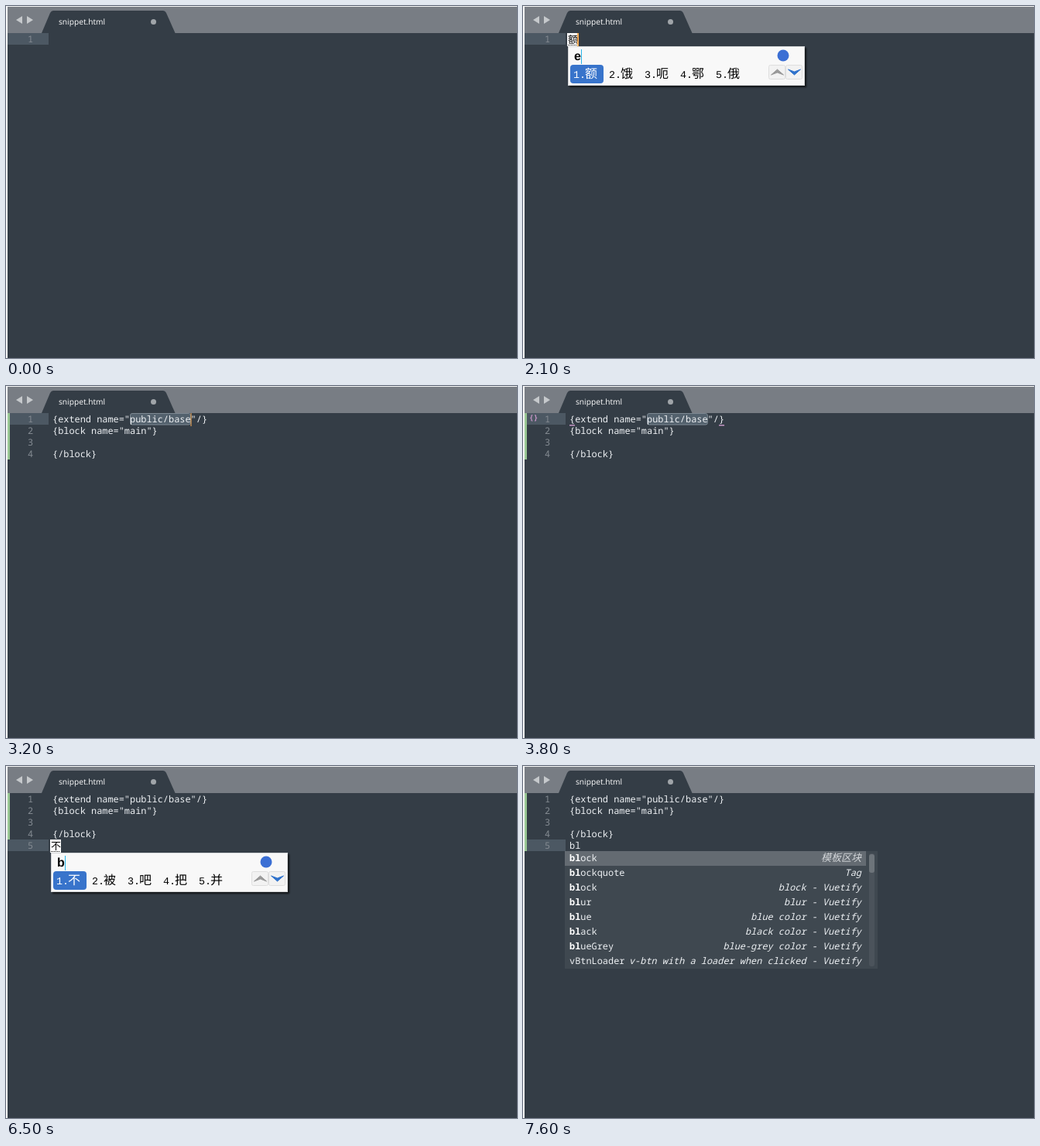
An HTML page for the animation above (8 s loop, 660x455 px).

```html
<!DOCTYPE html>
<html lang="en">
<head>
<meta charset="utf-8">
<title>Snippet typing</title>
<style>
  html, body { margin: 0; width: 100%; height: 100%; overflow: hidden; background: #343d46; }
  svg { display: block; width: 660px; height: 455px; }
  text { white-space: pre; text-rendering: geometricPrecision; }
  .code { font: 11.917px "Noto Sans Mono", "Noto Sans CJK SC", monospace; fill: #eef1f4; }
  .num { fill: #848b92; }
  .hint { font-style: italic; text-anchor: end; }
  .cjk { font: 300 16px "Noto Sans CJK SC", "Noto Sans CJK", sans-serif; }
  .digit { font: 13.33px "Liberation Mono", monospace; }
  .comp { font: 13px "Noto Sans CJK SC", "Noto Sans CJK", sans-serif; }
  .typed { font: bold 16px "Liberation Sans", sans-serif; }
  .tab { font: 10.2px "Open Sans", sans-serif; fill: #fff; }
</style>
</head>
<body>
<svg viewBox="0 0 660 455" xmlns="http://www.w3.org/2000/svg">
  <defs>
    <filter id="shade" x="-5%" y="-10%" width="110%" height="130%">
      <feDropShadow dx="2" dy="2" stdDeviation="1" flood-opacity=".7"/>
    </filter>
    <clipPath id="page"><path d="M2 35H660V455H2z"/></clipPath>
  </defs>
  <path d="M0 0H660V455H0z" fill="#f4f5f5"/>
  <path d="M2 1H660V35H2z" fill="#787d84"/>
  <path d="M2 35H660V455H2z" fill="#343d46"/>
  <path d="M46 35L57 9Q58.500 6 61 6H203Q205.500 6 207 9L218.500 35z" fill="#343d46"/>
  <path d="M21 13V23L13 18zM27 13V23L35 18z" fill="#c6c9cc"/>
  <text class="tab" x="68" y="24">snippet.html</text>
  <circle cx="190.500" cy="20.500" r="3.500" fill="#a0a5a9"/>
  <g id="view" clip-path="url(#page)"></g>
</svg>
<script>
const LOOP = 8000, CH = 7.15, ROW = 15, TOP = 35;
const page = document.getElementById('view');

const snippet = ['{extend name="public/base"/}', '{block name="main"}', '    ', '{/block}'];
const withLast = s => [...snippet, s];

const panels = {
  t: { w: 5.3, words: ['他', '她', '它', '天', '太'] },
  e: { w: 8.9, words: ['额', '饿', '呃', '鄂', '俄'] },
  ex: { w: 17.8, words: ['恶心', '恶性', '二线', '恶行', '饿'] },
  b: { w: 9.8, words: ['不', '被', '吧', '把', '并'] },
  bl: { w: 14.2, words: ['比例', '玻璃', '办理', '暴力', '部落'] }
};

const lists = {
  ex: { right: 401, items: [
    ['extend', '模板继承'], ['exit', 'exit icon - Vuetify'], ['expand', 'expand - Vuetify'],
    ['explore', 'explore icon - Vuetify'], ['export', 'export default'],
    ['extension', 'extension icon - Vuetify'], ['exposure', 'exposure icon - Vuetify'],
    ['vExpansionPanels', 'v-expansion-panels - Vuetify']] },
  bl: { right: 458, items: [
    ['block', '模板区块'], ['blockquote', 'Tag'], ['block', 'block - Vuetify'],
    ['blur', 'blur - Vuetify'], ['blue', 'blue color - Vuetify'],
    ['black', 'black color - Vuetify'], ['blueGrey', 'blue-grey color - Vuetify'],
    ['vBtnLoader', 'v-btn with a loader when clicked - Vuetify']] }
};

// Each step changes only the listed parts of the editor state.
const steps = [
  [0, { lines: [''], row: 0, col: 0, caret: 0, bar: 0, comp: '', panel: '', list: '', pair: null, sel: null, block: false }],
  [900, { caret: 1 }],
  [1200, { comp: '他', panel: 't' }],
  [1300, { caret: 0 }],
  [1700, { caret: 1 }],
  [1900, { comp: '', panel: '' }],
  [2100, { comp: '额', panel: 'e' }],
  [2300, { comp: '恶心', panel: 'ex' }],
  [2500, { caret: 0 }],
  [2600, { panel: '' }],
  [2700, { comp: '', lines: ['ex'], col: 2, caret: 1, bar: 1, list: 'ex' }],
  [3000, { lines: snippet, list: '', col: 25, sel: [0, 14, 25], bar: 4 }],
  [3200, { caret: .5 }],
  [3300, { caret: 0 }],
  [3600, { pair: [0, 0, 27], caret: .6 }],
  [3700, { caret: .3 }],
  [3800, { caret: 0 }],
  [4100, { row: 1, col: 17, caret: 1, sel: [1, 13, 17], pair: [1, 0, 18] }],
  [4400, { row: 2, col: 4, sel: null, pair: null }],
  [4700, { caret: .66 }],
  [4800, { caret: .33 }],
  [4900, { caret: 0 }],
  [5200, { row: 3, caret: 1, pair: [3, 0, 7], block: true }],
  [5600, { col: 8, block: false }],
  [5700, { lines: withLast(''), row: 4, col: 0 }],
  [6000, { pair: null, caret: .66 }],
  [6100, { caret: .33 }],
  [6200, { caret: 0 }],
  [6500, { comp: '不', panel: 'b' }],
  [6700, { comp: '比例', panel: 'bl', caret: 1 }],
  [6800, { caret: 0 }],
  [6900, { panel: '' }],
  [7100, { comp: '', lines: withLast('bl'), col: 2, caret: 1, bar: 5 }],
  [7200, { list: 'bl' }],
  [7500, { caret: .5 }],
  [7600, { caret: 0 }]
];

const rect = (x, y, w, h, fill, more = '') =>
  `<rect x="${x}" y="${y}" width="${w}" height="${h}" fill="${fill}" ${more}/>`;
const text = (cls, x, y, s, more = '') =>
  `<text class="${cls}" x="${x}" y="${y}" ${more}>${s}</text>`;
const rowY = row => TOP + row * ROW;
const colX = col => 60 + col * CH;

function drawPair([row, a, b]) {
  const y = rowY(row) + 15;
  return rect(colX(a), y, 7, 1.5, '#c695c6') + rect(colX(b), y, 7, 1.5, '#c695c6') +
    text('code', 8, rowY(row) + 9, '{}', 'style="font-size:9.500px;font-weight:bold;fill:#c695c6"');
}

function drawComp(s, y) {
  const w = s.length * 13;
  return rect(57, y, w + (s.length > 1 ? 0 : 1), 17, '#fff') + text('comp', 58, y + 13, s) +
    `<path d="M58 ${y + 15.5}h${w - 1}" stroke="#000" stroke-dasharray="1 1"/>` +
    (s.length > 1 ? rect(82, y, 2, 17, '#15191d') : '');
}

function drawPanel(key, y) {
  const { w, words } = panels[key];
  const extra = (words.join('').length - 5) * 16;
  const right = 364 + extra;
  let out = rect(58, y, right - 58, 51, '#f8f8f8', 'filter="url(#shade)"') +
    rect(58.5, y + .5, right - 59, 50, 'none', 'stroke="#d2d4d6"') +
    text('typed', 66, y + 18, key) + rect(Math.round(66 + w), y + 4, 1, 19, '#27b4e8') +
    `<circle cx="${right - 28}" cy="${y + 12}" r="7.500" fill="#3b6fd4"/>` +
    rect(61, y + 24, 27 + words[0].length * 16, 24, '#3874cb', 'rx="4"');
  let x = 65;
  words.forEach((word, i) => {
    const ink = `fill="${i ? '#000' : '#fff'}"`;
    out += text('digit', x, y + 41, i + 1 + '.', ink) + text('cjk', x + 15, y + 41, word, ink);
    x += 30 + word.length * 16;
  });
  const bx = right - 46.5, by = y + 24.5;
  out += rect(bx, by, 21, 18, '#f2f2f2', 'rx="2" stroke="#dedede"') +
    rect(bx + 22, by, 21, 18, '#f2f2f2', 'rx="2" stroke="#dedede"') +
    `<path d="M${bx + 3} ${by + 12.5}l8-7 8 7-8-3z" fill="#999" stroke="#999"/>` +
    `<path d="M${bx + 25} ${by + 5.5}l8 7 8-7-8 3z" fill="#2f72cc" stroke="#2f72cc"/>`;
  return out;
}

function drawList(key, y) {
  const { right, items } = lists[key];
  let out = rect(54, y, right - 54, 152, '#3f4850') +
    rect(54, y, right - 69, 19, '#646b72') +
    rect(right - 11, y + 3, 7, 146, '#4b535b', 'rx="3"') +
    rect(right - 11, y + 4, 7, 24, '#6d747a', 'rx="3"');
  items.forEach(([name, hint], i) => {
    const base = y + 13 + i * 19, n = name.startsWith(key) ? key.length : 0;
    const label = n ? `<tspan font-weight="bold" fill="#fff">${key}</tspan>${name.slice(n)}` : name;
    const big = /[^\x00-\x7f]/.test(hint) ? 'style="font-size:13px;fill:#d3d6d9"' : '';
    out += text('code', 60, base, label) + text('code hint', right - 21, base, hint, big);
  });
  return out;
}

function draw(s) {
  const y = rowY(s.row);
  let out = rect(2, y, 53, ROW, '#4c5863');
  if (s.bar) out += rect(2, TOP, 3, s.bar * ROW, '#99c794');
  if (s.sel) {
    const [row, a, b] = s.sel;
    out += rect(colX(a) + .4, rowY(row) + .5, (b - a) * CH - .8, 14.5, '#53616d', 'rx="2.500" stroke="#7d8993"');
  }
  s.lines.forEach((line, i) => {
    out += text('code num', 28, rowY(i) + 12, i + 1) + text('code', 60, rowY(i) + 12, line);
  });
  if (s.pair) out += drawPair(s.pair);
  if (s.block) out += rect(89, y, 7, 15, '#d3dfeb', 'rx="2"') +
    text('code', colX(4), y + 12, 'o', 'style="fill:#35496b"');
  if (s.comp) out += drawComp(s.comp, y);
  if (s.caret) {
    const x = s.comp ? 57 + 13 * s.comp.length : Math.round(59 + s.col * CH);
    out += rect(x, y - 2, 2, 19, '#f9ae58', `opacity="${s.caret}"`);
  }
  if (s.panel) out += drawPanel(s.panel, y + 17);
  if (s.list) out += drawList(s.list, y + 15);
  page.innerHTML = out;
}

let shown = -1;
function tick() {
  const t = performance.now() % LOOP;
  const now = steps.filter(([at]) => at <= t);
  if (now.length !== shown) {
    shown = now.length;
    draw(Object.assign({}, ...now.map(step => step[1])));
  }
  requestAnimationFrame(tick);
}
tick();
</script>
</body>
</html>
```
